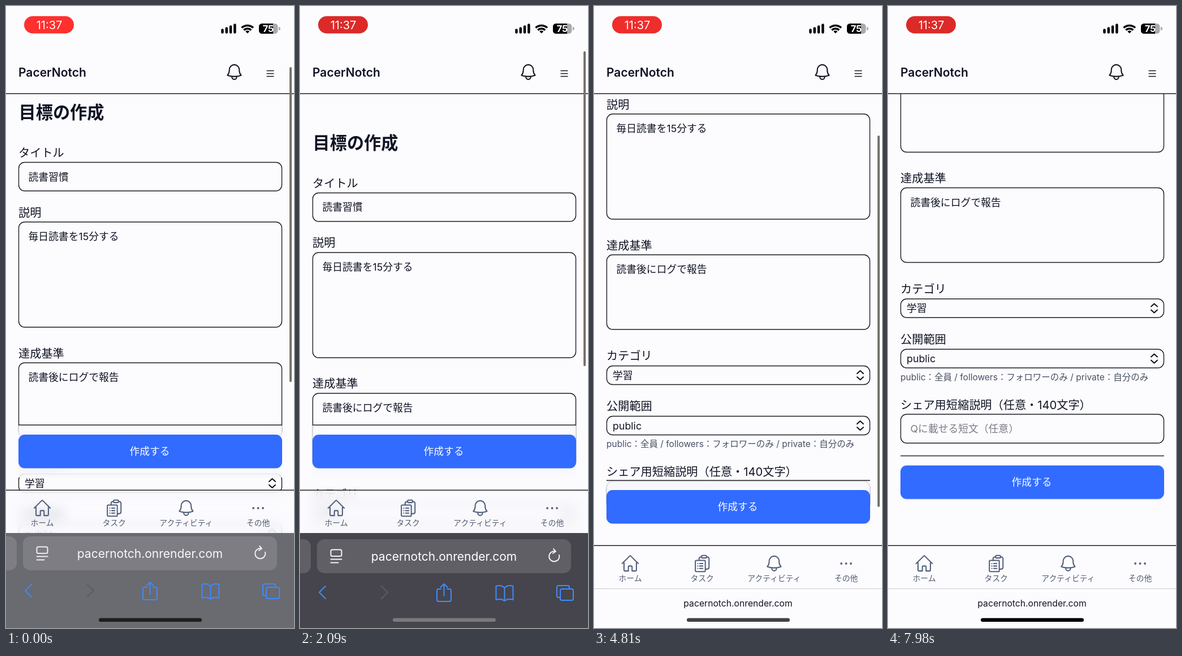
Animation, 509 px wide and 1100 px high, one loop 8000 ms. Source, as an HTML page:

```html
<!DOCTYPE html>
<html lang="ja">
<head>
<meta charset="utf-8">
<style>
html, body { margin: 0; width: 100%; height: 100%; overflow: hidden; background: #fcfcff; }
#stage { position: absolute; left: 0; top: 0; width: 509px; height: 1100px; overflow: hidden; }
#stage > * { position: absolute; left: 0; top: 0; }
svg { display: block; width: 509px; height: 1100px; overflow: visible; }
text { font-family: Inter, "Noto Sans CJK JP", "Noto Sans CJK", sans-serif; fill: #0f1222; }
.h1 { font-size: 30.2px; font-weight: 700; }
.label { font-size: 20.2px; }
.input { font-size: 17.8px; }
.hint { font-size: 15.5px; fill: #475063; }
.empty { fill: #7b7b86; }
.mid { text-anchor: middle; }
.box, .line { fill: none; stroke: #1c1c22; stroke-width: 1.4; }
.icon { fill: none; stroke-width: 1.4; stroke-linecap: round; stroke-linejoin: round; }
#panel, #nav { background: rgba(252,252,255,.76); backdrop-filter: blur(10px); }
#panel { left: 22px; width: 466px; height: 93px; }
#panel svg { width: 466px; height: 93px; }
#nav { width: 509px; height: 76px; }
#nav svg { height: 76px; }
#nav text { font-size: 13.8px; fill: #525b70; }
#nav .icon { stroke: #525f7a; }
#bar { width: 509px; height: 300px; }
#bar svg { height: 300px; }
#tools { fill: none; stroke-width: 2; stroke-linecap: round; stroke-linejoin: round; }
#tools text { font-size: 21px; fill: #fff; }
#scroll { left: 501px; width: 4px; border-radius: 2px; background: #74746c; }
</style>
</head>
<body>
<div id="stage">
  <svg id="page"></svg>
  <div id="panel"><svg>
    <path class="line" d="M0 0H466"/>
    <rect y="17" width="466" height="59.5" rx="11" fill="#316bff"/>
    <text class="input mid" x="232" y="53" style="fill:#fff">作成する</text>
  </svg></div>
  <svg id="head">
    <path d="M0-40H509V155H0Z" fill="#fcfcff"/>
    <path class="line" d="M0 155H509"/>
    <text x="22" y="125" font-size="21" font-weight="600">PacerNotch</text>
    <g class="icon" stroke="#15161f" id="headBell"></g>
    <path d="M460.500 114.500h13m-13 5h13m-13 5h13" stroke="#15161f" stroke-width="1.7"/>
  </svg>
  <svg id="status">
    <rect id="pill" x="32" y="18" width="88" height="30.500" rx="15.200"/>
    <text class="mid" x="76.500" y="40.500" font-size="20" style="fill:#fff">11:37</text>
    <path d="M382.500 46.500v-4m7.300 4v-7m7.300 7v-10m7.300 10v-13" stroke="#000" stroke-width="4.500" stroke-linecap="round"/>
    <g fill="none" stroke="#000" stroke-width="3.500">
      <path d="M416.500 38.500a15 15 0 0 1 20.500 0M420.300 42.600a9.500 9.500 0 0 1 13 0"/>
      <path d="M426.800 48.500l-3.500-3.500a5 5 0 0 1 7 0z" fill="#000" stroke="none"/>
    </g>
    <rect x="447" y="31" width="33.500" height="18" rx="5.500" fill="#aaaaad"/>
    <path d="M452.500 31H472V49H452.500a5.500 5.500 0 0 1-5.500-5.500v-7a5.500 5.500 0 0 1 5.500-5.500z"/>
    <path d="M482 37a3 3 0 0 1 0 6z" fill="#aaaaad"/>
    <text class="mid" x="463.500" y="46" font-size="16.500" font-weight="700" style="fill:#fff">75</text>
  </svg>
  <div id="nav"><svg></svg></div>
  <div id="bar"><svg>
    <g id="tools">
      <rect x="-60" y="-30" width="79" height="60" rx="13" fill="#fff" fill-opacity=".14"/>
      <rect x="30" y="-30" width="449" height="60" rx="13" fill="#fff" fill-opacity=".14"/>
      <text class="mid" x="254.500" y="7.500">pacernotch.onrender.com</text>
      <g stroke="#f4f4f6">
        <rect x="54.500" y="-11.500" width="19" height="11.500" rx="2.500"/>
        <path d="M54.500 5.500h19M54.500 11.500h13M451-8.500a9 9 0 1 0 7 6.500M448-13l4 4.500-5 3.500"/>
      </g>
      <g id="buttons" stroke="#3f8cff">
        <path d="M45-11L34 0l11 11"/>
        <path d="M144-11l11 11-11 11" stroke="#5d5d60"/>
        <path d="M249-6h-4q-3 0-3 3v16q0 3 3 3h19q3 0 3-3v-16q0-3-3-3h-4M254.500 6v-21m-6 6l6-6 6 6"/>
        <path d="M361.500-8q-6-6-15-3v24q9-3 15 2 6-5 15-2v-24q-9-3-15 3v23"/>
        <path d="M459 9h-2q-3 0-3-3v-15q0-3 3-3h16q3 0 3 3v2"/>
        <rect x="460" y="-6" width="23" height="20" rx="3"/>
      </g>
    </g>
    <g id="mini">
      <path d="M0 .5H509" stroke="#c9c9cf"/>
      <text class="mid" x="254.500" y="31.500" font-size="15.700">pacernotch.onrender.com</text>
    </g>
  </svg></div>
  <svg><rect id="home" x="164" y="1082.500" width="182" height="6.500" rx="3.200"/></svg>
  <div id="scroll"></div>
</div>
<script>
const $ = id => document.getElementById(id);
const clamp = (v, a = 0, b = 1) => Math.min(b, Math.max(a, v));
const mix = (a, b, k) => a + (b - a) * k;

// Form, laid out in scroll coordinates
const text = (cls, x, y, s) => `<text class="${cls}" x="${x}" y="${y}">${s}</text>`;
const box = (y, h) => `<rect class="box" x="22.500" y="${y}" width="465" height="${h}" rx="10.500"/>`;
const field = (label, y, h, value, cls = '') =>
  text('label', 22, y - 9.5, label) + box(y, h) + text('input ' + cls, 39.5, y + 32, value);
const select = (label, y, value) =>
  text('label', 22, y - 10.5, label) + box(y, 33) + text('input', 33, y + 23, value) +
  `<path class="icon" stroke="#111" style="stroke-width:2" d="M465 ${y + 13.5}l5.500-5 5.500 5m0 6l-5.500 5-5.500-5"/>`;

$('page').innerHTML =
  text('h1', 22.5, 198.7, '目標の作成') +
  field('タイトル', 276.5, 50.5, '読書習慣') +
  field('説明', 382, 186, '毎日読書を15分する') +
  field('達成基準', 631, 132, '読書後にログで報告') +
  select('カテゴリ', 827.5, '学習') +
  select('公開範囲', 916.5, 'public') +
  text('hint', 22, 971, 'public：全員 / followers：フォロワーのみ / private：自分のみ') +
  field('シェア用短縮説明（任意・140文字）', 1031.5, 51, 'Qに載せる短文（任意）', 'empty');

// Icons on a 24 unit grid
const bell = '<path d="M14.900 17.100a24 24 0 0 0 5.400-1.300A9 9 0 0 1 18 9.750V9A6 6 0 0 0 6 9v.75a9 9 0 0 1-2.300 6c1.700.65 3.600 1.100 5.400 1.300a24 24 0 0 0 5.800 0a3 3 0 1 1-5.800 0"/>';
const house = '<path d="M2.250 12l9-9q.75-.6 1.500 0l9 9M4.500 9.750V20q0 1 1 1H9.750v-5q0-1 1-1h2.500q1 0 1 1v5h4.250q1 0 1-1V9.750"/>';
const clipboard = '<rect x="3.750" y="8.250" width="12" height="13.500" rx="1.100"/><rect x="11.250" y="2.250" width="6" height="3" rx="1.200"/>' +
  '<path d="M8.250 8.250V6.100q0-2.200 3-2.200M16 18.750h2q2.250 0 2.250-2.250V6.100q0-2.200-3-2.200M9 12h3.700M9 15h3.700M9 18h3.700M6.700 12h.1M6.700 15h.1M6.700 18h.1"/>';
const dots = [6.2, 12, 17.8].map(x => `<circle cx="${x}" cy="12" r=".6"/>`).join('');
const icon = (shape, x, y) =>
  `<g class="icon" transform="translate(${x} ${y}) scale(1.460) translate(-12 -12)">${shape}</g>`;

$('headBell').innerHTML = icon(bell, 403.5, 117);
$('nav').firstChild.innerHTML = '<path class="line" d="M0 .2H509"/>' +
  [[house, 'ホーム'], [clipboard, 'タスク'], [bell, 'アクティビティ'], [dots, 'その他']]
    .map(([shape, name], i) => icon(shape, 64 + 127.2 * i, 32) + text('mid', 64 + 127.2 * i, 62.5, name)).join('');

// Monotone cubic through [time, value] pairs
function curve(...keys) {
  const d = i => (keys[i + 1][1] - keys[i][1]) / (keys[i + 1][0] - keys[i][0]);
  const slope = i => {
    if (!i || i === keys.length - 1) return 0;
    const a = d(i - 1), b = d(i);
    return a * b > 0 ? 2 * a * b / (a + b) : 0;
  };
  return t => {
    if (t >= keys[keys.length - 1][0]) return keys[keys.length - 1][1];
    const i = keys.findIndex((k, n) => t < keys[n + 1][0]);
    const [t0, v0] = keys[i], [t1, v1] = keys[i + 1];
    const w = t1 - t0, u = (t - t0) / w, e = u * u * (3 - 2 * u);
    return mix(v0, v1, e) + w * u * (1 - u) * (slope(i) * (1 - u) - slope(i + 1) * u);
  };
}

const scrollAt = curve([0, 0], [450, 52], [1000, 80], [1600, 70], [2090, 54], [2960, 18], [4200, -62],
  [5000, -235], [5400, -316], [5510, -314.5], [5900, -309.5]);
const navAt = curve([0, 856], [450, 843.5], [1600, 843.5], [2090, 856], [2600, 944], [2960, 952], [3200, 954]);
const lightAt = curve([0, .2], [400, 0], [2090, 0], [2650, 1]);
const pulseAt = curve([0, 1], [1000, .55], [2090, 0], [2960, .45], [4200, 1], [5510, 0], [6750, 1], [7980, 0]);
const homeAt = curve([0, 30], [1000, 58], [2090, 122], [2960, 66], [6800, 66], [7400, 0]);

const move = (el, y) => el.style.transform = `translateY(${y}px)`;
const rgb = (a, b, k) => `rgb(${a.map((v, i) => Math.round(mix(v, b[i], k)))})`;

function draw(t) {
  const s = scrollAt(t), nav = navAt(t), light = lightAt(t);
  const over = Math.max(0, s - 70);
  move($('page'), s);
  move($('head'), over);
  move($('panel'), Math.min(1105 + s, nav - 115));
  move($('nav'), nav);
  move($('bar'), nav + 76);

  $('bar').style.background = rgb([70, 69, 77], [252, 252, 255], light);
  $('tools').setAttribute('transform', `translate(0 ${41 - 25 * light})`);
  $('tools').style.opacity = 1 - light * light;
  $('buttons').setAttribute('transform', `translate(0 ${64 + 10 * light})`);
  $('mini').style.opacity = clamp(2 * light - 1);

  const home = homeAt(t);
  $('home').style.fill = `rgb(${home}, ${home}, ${home})`;
  $('pill').style.fill = rgb([219, 42, 40], [255, 48, 46], pulseAt(t));

  const k = clamp((nav - 856) / 98);
  const bar = $('scroll').style, pos = Math.min(s, 70);
  bar.top = mix(108 - .52 * pos, 114 - .6 * pos, k) + 'px';
  bar.height = mix(557, 657, k) - 2.3 * over + 'px';
  bar.opacity = 1 - clamp((t - 7000) / 400);
}

const start = performance.now();
(function loop() {
  draw((performance.now() - start) % 8000);
  requestAnimationFrame(loop);
})();
</script>
</body>
</html>
```
